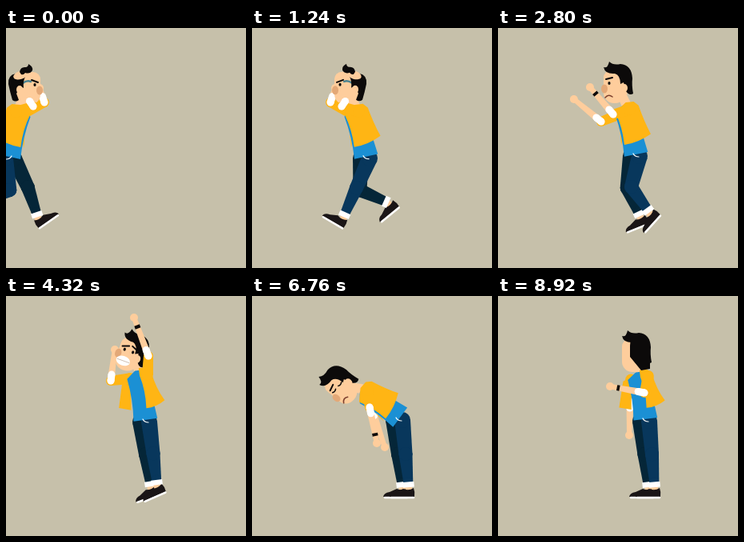
An HTML page with a canvas for the animation above (8.96 s loop, 300 px wide and 300 px high).

```html
<!DOCTYPE html>
<html lang="en">
<head>
<meta charset="utf-8">
<title>Pacing man</title>
<style>
html, body { margin: 0; width: 100%; height: 100%; overflow: hidden; background: #c6c0aa; }
canvas { display: block; width: 300px; height: 300px; }
</style>
</head>
<body>
<canvas id="stage"></canvas>
<script>
const LOOP = 8960, STEP = 40, WALK_END = 2600, STRIDE = 350, LEG = 40;
const BG = '#c6c0aa', SKIN = '#fecd9c', SHADE = '#e3a877', YELLOW = '#ffb514', BLUE = '#1b90d4',
  JEANS = '#08375c', DARK = '#052638', BLACK = '#0c0a0a', SHOE = '#1a1516', WHITE = '#fff';

const canvas = document.getElementById('stage');
const ctx = canvas.getContext('2d');
const ratio = window.devicePixelRatio || 1;
canvas.width = canvas.height = 300 * ratio;

const lerp = (a, b, k) => a + (b - a) * k;
const smooth = k => k * k * (3 - 2 * k);

function mix(a, b, k) {
  if (typeof a === 'number') return lerp(a, b, k);
  if (typeof a === 'string') return k < 0.5 ? a : b;
  if (Array.isArray(a)) return a.map((v, i) => mix(v, b[i], k));
  return Object.fromEntries(Object.keys(a).map(key => [key, mix(a[key], b[key], k)]));
}

function sample(track, t, ease) {
  let i = 0;
  while (i < track.length - 2 && t >= track[i + 1][0]) i++;
  const [t0, a] = track[i], [t1, b] = track[i + 1];
  return mix(a, b, ease(Math.min(1, Math.max(0, (t - t0) / (t1 - t0)))));
}

// Poses face left. x values are relative to the hip; feet are [x, y, degrees].
const plead = {
  x: 172, dir: 1, hip: 155, neck: [-12, 95], head: [-23, 71, 0], open: 0, away: 0, face: 'sad',
  farElbow: [-43, 117], farHand: [-77, 89], elbow: [-28, 108], hand: [-57, 74],
  farFoot: [6, 236, -22], foot: [18, 231, -48]
};
const yell = {
  x: 174, dir: 1, hip: 152, neck: [-8, 92], head: [-17, 72, 20], open: 1, away: 0, face: 'yell',
  farElbow: [-43, 106], farHand: [-38, 67], elbow: [4, 75], hand: [-14, 27],
  farFoot: [7, 239, -20], foot: [15, 237, -24]
};
const bow = {
  x: 183, dir: 1, hip: 150, neck: [-46, 116], head: [-71, 112, -50], open: 0, away: 0, face: 'shut',
  farElbow: [-33, 142], farHand: [-17, 189], elbow: [-36, 139], hand: [-27, 184],
  farFoot: [5, 240, 0], foot: [13, 240, 0]
};
const stand = {
  x: 184, dir: 1, hip: 151, neck: [-7, 94], head: [-12, 72, 0], open: 1, away: 0, face: 'sad',
  farElbow: [-19, 132], farHand: [-20, 174], elbow: [-1, 121], hand: [-44, 113],
  farFoot: [4, 240, 0], foot: [12, 240, 0]
};
const reach = { ...plead, farHand: [-97, 82], hand: [-62, 66] };
const turned = { ...plead, x: 163, dir: -1, hand: [-61, 66], farHand: [-62, 82] };
const away = { ...stand, away: 1 };
const back = {
  ...stand, x: 183, dir: -1, open: 0, elbow: [-24, 116], hand: [-57, 103],
  farElbow: [-26, 120], farHand: [-52, 118]
};

// time, [hip x, direction, stride size]
const pacing = [
  [0, [4, -1, 1]], [680, [207, -1, 1]], [780, [233, -1, 0.8]], [870, [234, 1, 0.6]],
  [960, [213, 1, 1]], [1540, [66, 1, 0.8]], [1660, [58, 1, 0.4]], [1760, [58, -1, 0.4]],
  [1840, [73, -1, 0.4]], [1960, [103, -1, 1]], [2410, [232, -1, 0.9]], [2500, [235, 1, 0.7]],
  [2800, [174, 1, 0.4]]
];

function walk(t) {
  const [x, dir, size] = sample(pacing, t, k => k);
  const phase = 2 * Math.PI * t / STRIDE;
  const step = (p, rest) => [
    -36 * size * Math.cos(p) + rest * (1 - size),
    237 - 24 * size * size * Math.max(0, -Math.sin(p + 0.9)),
    (-5 + 40 * Math.cos(p)) * size
  ];
  const bob = 2 * Math.cos(2 * phase);
  return {
    x, dir, hip: 156 + bob, neck: [-13, 97 + bob / 2], head: [-22, 72 + bob / 2, 0],
    open: 0, away: 0, face: 'held',
    farElbow: [-44, 93], farHand: [-38, 75], elbow: [-30, 98], hand: [-21, 85],
    farFoot: step(phase, -20), foot: step(phase + Math.PI, 34)
  };
}

const acting = [
  [WALK_END, walk(WALK_END)], [2790, plead], [3000, reach], [3200, plead], [3380, yell],
  [3560, turned], [3780, { ...yell, hand: [-14, 23] }], [3960, plead], [4120, turned], [4300, yell],
  [4400, yell], [4600, plead], [4780, turned], [5000, yell], [5180, reach], [5360, plead],
  [5520, back], [5800, { ...back, hand: [-57, 93] }], [6100, back], [6440, back], [6740, bow],
  [7080, { ...bow, head: [-70, 115, -54] }], [7400, bow], [7900, stand], [8320, stand],
  [8600, away], [LOOP, away]
];

function poly(points, color) {
  ctx.fillStyle = color;
  ctx.beginPath();
  points.forEach(p => ctx.lineTo(...p));
  ctx.closePath();
  ctx.fill();
}

function oval(x, y, rx, ry, color, turn = 0) {
  ctx.fillStyle = color;
  ctx.beginPath();
  ctx.ellipse(x, y, rx, ry, turn, 0, 7);
  ctx.fill();
}

function shape(path, color) {
  ctx.fillStyle = color;
  ctx.fill(new Path2D(path));
}

function line(points, width, color, cap = 'round') {
  ctx.strokeStyle = color;
  ctx.lineWidth = width;
  ctx.lineCap = cap;
  ctx.beginPath();
  if (points.length === 3) {
    ctx.moveTo(...points[0]);
    ctx.quadraticCurveTo(...points[1], ...points[2]);
  } else points.forEach(p => ctx.lineTo(...p));
  ctx.stroke();
}

function limb(a, b, wa, wb, color) {
  const angle = Math.atan2(b[1] - a[1], b[0] - a[0]);
  const side = (p, w, s) => [p[0] - s * Math.sin(angle) * w / 2, p[1] + s * Math.cos(angle) * w / 2];
  poly([side(a, wa, 1), side(b, wb, 1), side(b, wb, -1), side(a, wa, -1)], color);
  oval(...a, wa / 2, wa / 2, color);
  oval(...b, wb / 2, wb / 2, color);
}

function arm(shoulder, elbow, hand, watch) {
  const length = Math.hypot(hand[0] - elbow[0], hand[1] - elbow[1]) || 1;
  const cuff = mix(elbow, hand, Math.min(1, 8 / length));
  limb(shoulder, elbow, 14, 12, YELLOW);
  limb(elbow, hand, 9, 6, SKIN);
  oval(...hand, 5, 5, SKIN);
  limb(elbow, cuff, 9, 9, WHITE);
  if (watch) line([mix(elbow, hand, 0.72), mix(elbow, hand, 0.8)], 7, BLACK, 'butt');
}

function leg(hip, [x, y, turn], color) {
  const dx = x - hip[0], dy = y - hip[1], d = Math.hypot(dx, dy);
  const bend = Math.sqrt(Math.max(0, LEG * LEG - d * d / 4));
  const knee = [hip[0] + dx / 2 - bend * dy / d, hip[1] + dy / 2 + bend * dx / d];
  const along = k => mix(knee, [x, y], k);
  limb(along(0.9), [x, y + 2], 9, 8, SKIN);
  ctx.save();
  ctx.translate(x, y);
  ctx.rotate(turn * Math.PI / 180);
  shape('M-7 1Q0 4 6 0Q8 5 7 11H-24Q-23 6 -16 5Z', SHOE);
  line([[-22, 12], [6, 12]], 2.5, WHITE);
  ctx.restore();
  limb(hip, knee, 20, 17, color);
  limb(knee, along(0.82), 17, 12, color);
  line([along(0.82), along(0.98)], 14, WHITE, 'butt');
}

function features(face) {
  oval(-16, 5, 4, 5.5, SHADE);
  if (face === 'shut') {
    line([[-14, -3], [-11, -1], [-8, -3]], 1.5, BLACK);
    line([[-3, -3], [0, -1], [3, -3]], 1.5, BLACK);
  } else {
    oval(-10, -2, 1.6, 2, BLACK);
    if (face === 'yell') oval(1, -2, 1.6, 2, BLACK);
  }
  const frown = face === 'held' || face === 'yell';
  line([[-14, frown ? -5 : -7], [-6, frown ? -8 : -9]], 2, BLACK);
  if (face === 'yell') {
    line([[-2, -9], [5, -6]], 2, BLACK);
    oval(-7, 12, 9, 6, WHITE);
    line([[-15, 12], [1, 12]], 0.8, '#c9b7a8');
  } else if (face === 'held') line([[-5, -6], [0, -8], [5, -4]], 2.5, '#4b8390');
  else line([[-15, 16], [-11, 11], [-6, 15]], 1.6, '#7c3f2e');
}

function hair(face, away) {
  if (face === 'held') {
    shape('M2 -12L14 -16Q24 -14 23 -3Q21 7 18 17Q14 20 10 17L13 9L8 0L4 2Q5 -6 2 -12Z', BLACK);
    oval(8, -14, 9, 5, SKIN, 0.3);
    shape('M9 -18Q8 -25 1 -24Q-2 -25 -2 -28Q-8 -25 -7 -20Q-4 -15 2 -17Q4 -14 7 -15Z', BLACK);
    return;
  }
  shape('M-10 -29Q-5 -24 4 -26Q18 -25 19 -8Q18 0 20 11Q15 14 11 8L8 -3L4 -1' +
    'Q4 -12 -3 -14Q-15 -13 -17 -22Q-12 -20 -10 -29Z', BLACK);
  if (away > 0) {
    const edge = lerp(10, -7, away);
    poly([[-6, -20], [12, -22], [18, -12], [18, 19], [7, 21], [edge, 4], [edge, -10]], BLACK);
  }
}

function head({ head: [x, y, turn], away, face }) {
  ctx.save();
  ctx.translate(x, y);
  ctx.rotate(turn * Math.PI / 180);
  ctx.fillStyle = SKIN;
  ctx.beginPath();
  ctx.roundRect(-17, -18, 30, 41, [9, 10, 16, 13]);
  ctx.fill();
  if (away < 0.5) features(face);
  hair(face, away);
  if (away < 0.5) oval(9, 4, 4, 5, SKIN);
  ctx.restore();
}

function figure(p) {
  const { hip, neck, open } = p;
  const tilt = Math.atan2(neck[0], hip - neck[1]);
  const stretch = Math.hypot(neck[0], hip - neck[1]) / 63;
  const shoulder = (r, u) => [
    r * Math.cos(tilt) + u * stretch * Math.sin(tilt),
    hip + r * Math.sin(tilt) - u * stretch * Math.cos(tilt)
  ];

  ctx.save();
  ctx.translate(p.x, 0);
  ctx.scale(Math.sign(p.dir || 1) * Math.max(0.4, Math.abs(p.dir)), 1);

  arm(shoulder(lerp(-4, -12, open), 53), p.farElbow, p.farHand, false);
  leg([-6, hip + 5], p.farFoot, DARK);
  leg([5, hip + 5], p.foot, JEANS);
  limb(neck, mix(neck, p.head, 0.6), 12, 11, SKIN);

  ctx.save();
  ctx.translate(0, hip);
  ctx.rotate(tilt);
  ctx.scale(1, stretch);
  poly([[-11, -57], [lerp(-14, -22, open), -52], [lerp(-14, -31, open), -17], [-16, -12]], YELLOW);
  shape('M-15 3Q-12 -25 -16 -53L-5 -62L9 -62L15 3Z', BLUE);
  const hem = lerp(-12, 3, open), lapel = lerp(-15, 0, open), tail = lerp(23, 27, open);
  shape(`M${hem} -12Q${hem + 2} -35 ${lapel} -55L0 -65L10 -64L15 -58` +
    `Q18 -36 ${tail} -19Q${(hem + tail) / 2} -11 ${hem} -12Z`, YELLOW);
  ctx.restore();

  line([[-3, hip + 2], [-1, hip + 6], [4, hip + 6]], 1.2, WHITE);
  head(p);
  arm(shoulder(lerp(3, 10, open), 55), p.elbow, p.hand, p.face !== 'held');
  ctx.restore();
}

const start = performance.now();

function frame() {
  const t = Math.floor((performance.now() - start) % LOOP / STEP) * STEP;
  ctx.setTransform(ratio, 0, 0, ratio, 0, 0);
  ctx.fillStyle = BG;
  ctx.fillRect(0, 0, 300, 300);
  figure(t < WALK_END ? walk(t) : sample(acting, t, smooth));
  requestAnimationFrame(frame);
}
frame();
</script>
</body>
</html>
```
